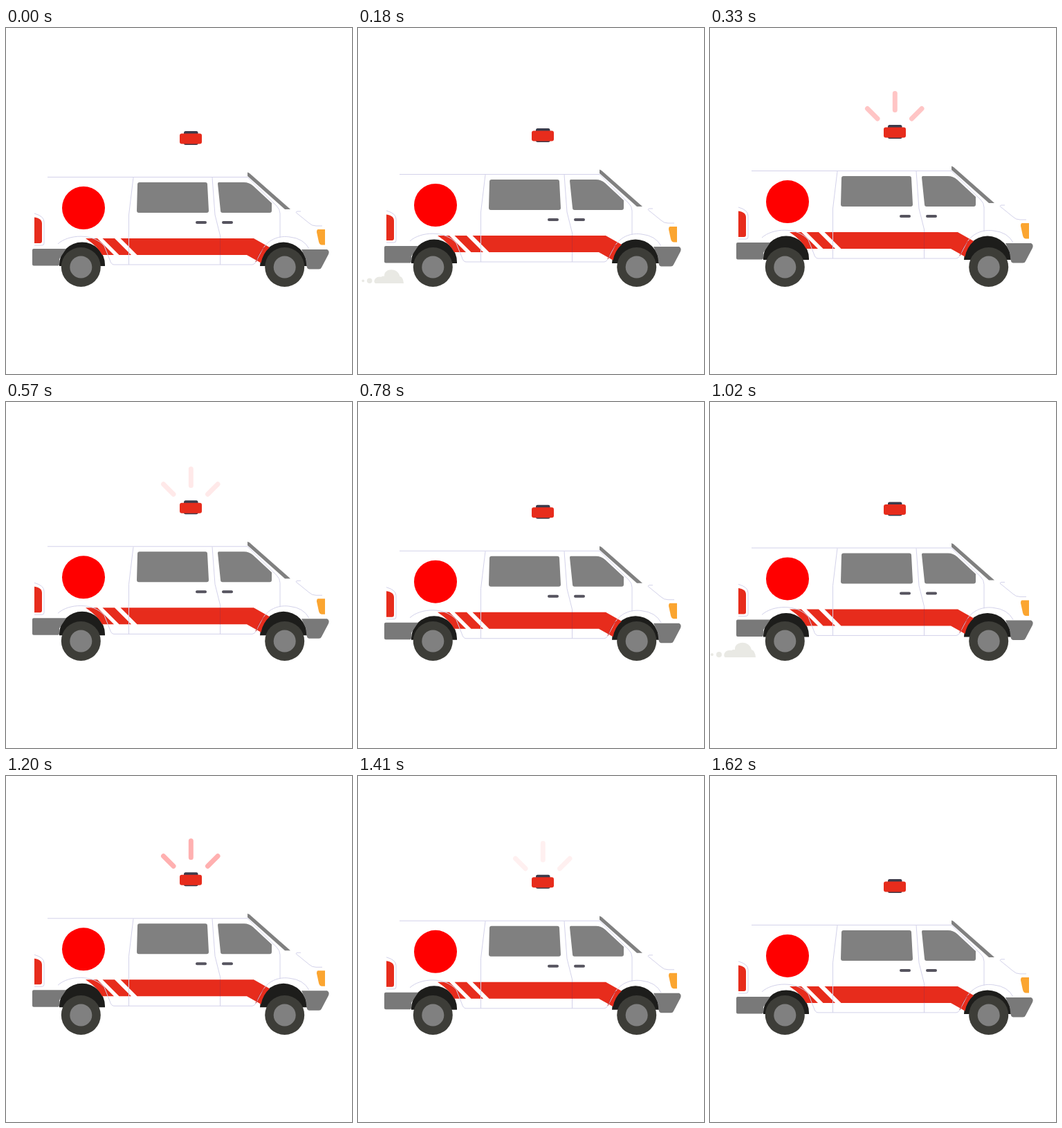
An HTML page for the animation above (1650 ms loop, 500 px wide and 500 px high).

```html
<!DOCTYPE html>
<html lang="en">
<head>
<meta charset="utf-8">
<title>Ambulance</title>
<style>
  html, body { margin: 0; width: 100%; height: 100%; overflow: hidden; background: #fff; }
  svg { display: block; width: 100%; height: 100%; }
  .line { fill: none; stroke: #d3d2ea; stroke-width: 1; }
  .red { fill: #e72c1c; }
  .grey { fill: #808080; }
  .bumper { fill: #797979; }
  .dark { fill: #3b3b4b; }
  .black { fill: #1d1d1b; }
  .tyre { fill: #3d3d38; }
</style>
</head>
<body>
<svg viewBox="0 0 500 500">
  <g id="dust" fill="#e9e9e4">
    <path d="M22 369Q19 367 21 363Q24 358 31 359Q34 357 36 358C35 345 57 344 60 358Q65 359 66 369Z"/>
    <circle cx="13" cy="365" r="4"/>
    <circle cx="3" cy="365" r="2"/>
  </g>

  <g id="van">
    <path id="rays" d="M267.3 103.5V127.5M227.5 125.5L242 140M306 125.5L291.5 140"
          fill="none" stroke="#f00" stroke-width="7" stroke-linecap="round"/>

    <rect class="dark" x="257" y="149" width="20.5" height="20" rx="2.5"/>
    <rect class="red" x="251" y="152.5" width="32" height="15" rx="3"/>

    <path class="black" d="M77 344V342a33 32.5 0 0 1 66 0V344ZM367 344a34 34.5 0 0 1 68 0Z"/>
    <path class="red" d="M115 304H132L156 328H139Q133 316 115 304ZM139.5 304H157L181 328H163.5ZM165.5 304H358L381 317Q371 326 368.5 339.5L348 328H189.5Z"/>

    <g class="line">
      <path d="M60 215.5H349L391 257Q396 262 396 268V303"/>
      <path d="M184 216L177.5 270V342"/>
      <path d="M298 216L302 270L309.5 300V342"/>
      <path d="M75 312C90 298 126 296 142 315L150 335Q152 342 156 342H356Q359 342 361 338L370 321C380 303 398 300 410 302Q430 304 438 319"/>
      <path d="M41 268Q55 272 55 280V311Q55 314 52 314H41"/>
      <path d="M426 265H421Q417 266 422 269L438 282Q442 286 448 286H457"/>
    </g>
    <path d="M309.5 304V328M361 338Q366 324 373 317" fill="none" stroke="#c72c2c"/>

    <path class="grey" d="M193 223H288q3 0 3 3l2 38q0 3-3 3H192q-3 0-3-3l1-38q0-3 3-3Z"/>
    <path class="grey" d="M307.500 223H344Q351 223 357 228L384 253V264q0 3-3 3H313q-3 0-3-3L306 225q0-2 1.500-2Z"/>
    <path class="grey" d="M349 208.500L352 210L411 262H403L349 214Z"/>
    <g fill="#56545f">
      <rect x="274" y="279" width="16" height="4" rx="2"/>
      <rect x="312" y="279" width="16" height="4" rx="2"/>
    </g>

    <circle cx="112" cy="260" r="31" fill="#f00"/>

    <path class="red" d="M41 273.500C49 274.500 52 278 52 283V308q0 3-3 3H41Z"/>
    <path d="M451 291H461V313.500H456Q453 313 452 309L449 295Q449 291 451 291Z" fill="#fba530"/>
    <path class="bumper" d="M40 319H87L77 334V341.500q0 2-2 2H40q-2 0-2-2V321q0-2 2-2Z"/>
    <path class="bumper" d="M427 320H464Q468 322 466 327L456 346Q455 348.500 452 348.500H438Q435 348 434.500 344L433 333Z"/>
  </g>

  <g>
    <circle class="tyre" cx="108.300" cy="345.500" r="28.500"/>
    <circle class="grey" cx="108.300" cy="345.500" r="16"/>
    <circle class="tyre" cx="402.700" cy="345.500" r="28.500"/>
    <circle class="grey" cx="402.700" cy="345.500" r="16"/>
  </g>
</svg>
<script>
  const BOUNCE = 825, LIFT = 9.9;
  const [van, rays, dust] = ["van", "rays", "dust"].map(id => document.getElementById(id));
  const clamp = x => Math.max(0, Math.min(1, x));

  function draw(ms) {
    const t = ms % BOUNCE, p = t / BOUNCE;
    const lift = LIFT * (1 - Math.cos(2 * Math.PI * p)) / 2;
    van.setAttribute("transform", `translate(0 ${-lift})`);
    rays.setAttribute("opacity", Math.max(0, 1.5 * (0.25 - Math.abs(p - 0.5))));

    // The puff swells behind the rear wheel, then drifts off and fades.
    const grow = clamp((t - 60) / 130), leave = clamp((t - 200) / 110);
    dust.setAttribute("transform",
      `translate(${66 - 30 * leave} 369) scale(${grow}) translate(-66 -369)`);
    dust.setAttribute("opacity", grow > 0 ? 1 - leave : 0);
  }

  const start = performance.now();
  function frame() {
    draw(performance.now() - start);
    requestAnimationFrame(frame);
  }
  frame();
</script>
</body>
</html>
```
